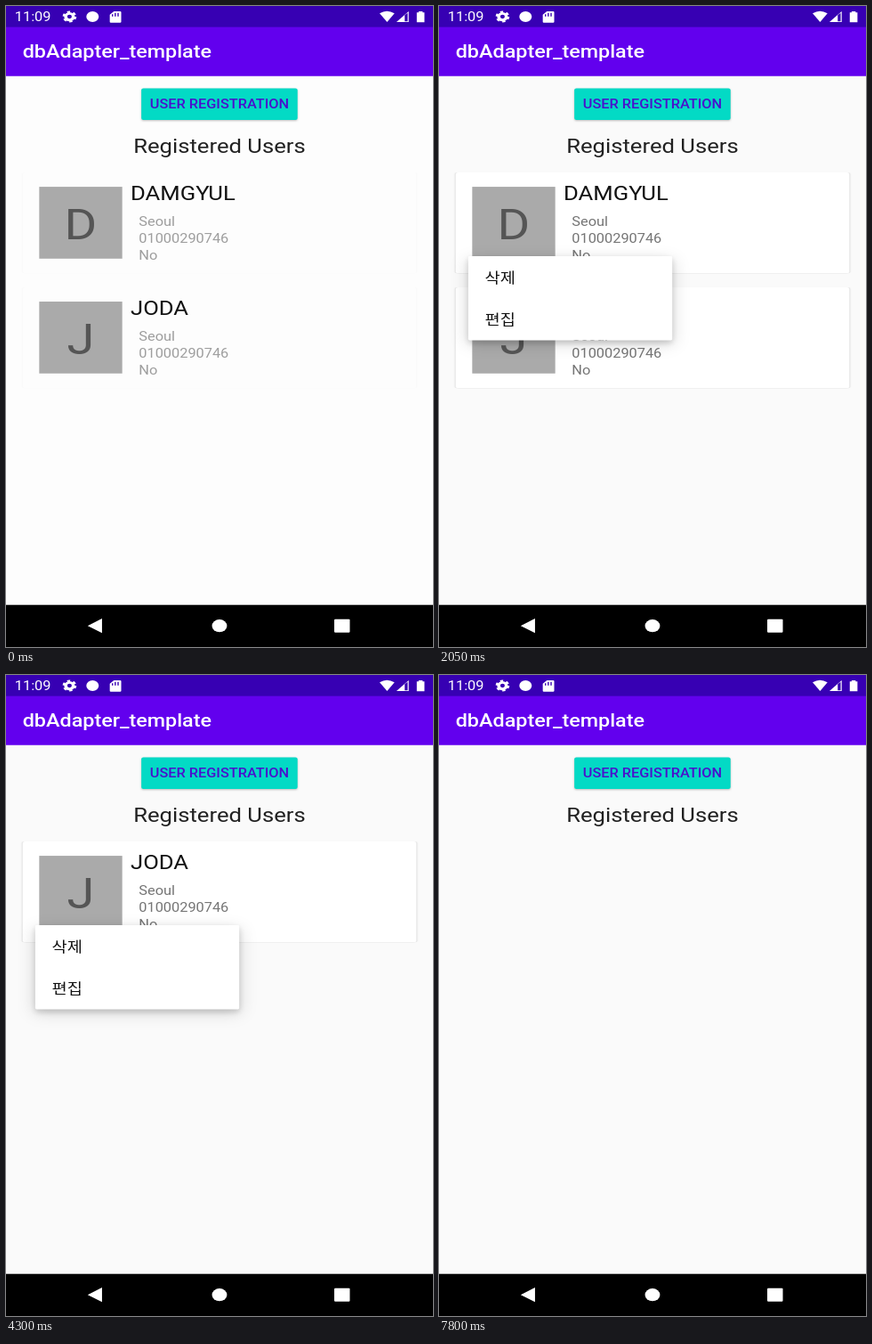
An HTML page for the animation above (7880 ms loop, 480 by 720 pixels).

```html
<!DOCTYPE html>
<html lang="en">
<head>
<meta charset="utf-8">
<title>Registered users</title>
<style>
  html, body { margin: 0; width: 100%; height: 100%; overflow: hidden; background: #fafafa; }
  svg { display: block; width: 480px; height: 720px; font-family: Roboto, sans-serif; }
  .paper { fill: #fff; filter: drop-shadow(0 .8px .8px rgba(0, 0, 0, .24)); }
  .name { font-size: 22px; fill: #111; }
  .info { font-size: 14px; fill: #757575; }
  .letter { font-size: 48px; fill: #555; text-anchor: middle; }
  .mid { text-anchor: middle; }
  .sheet { fill: #fff; filter: drop-shadow(0 3px 3px rgba(0, 0, 0, .16)) drop-shadow(0 4px 8px rgba(0, 0, 0, .16)); }
  .item { font: 16px "Noto Sans CJK KR", "Noto Sans CJK JP", "Noto Sans CJK", sans-serif; fill: #111; }
</style>
</head>
<body>
<!-- Laid out in dp; the screen is squeezed to the stage as a whole. -->
<svg viewBox="0 0 411.43 731.43" preserveAspectRatio="none">
  <defs>
    <clipPath id="reveal"><rect id="window"/></clipPath>
    <clipPath id="row"><rect width="196.5" height="48"/></clipPath>
  </defs>
  <rect id="back" width="412" height="732"/>
  <rect width="412" height="80" fill="#6200ee"/>
  <rect width="412" height="24" fill="#3700b3"/>
  <rect y="683.4" width="412" height="49"/>
  <rect x="130.4" y="94" width="150.5" height="36" rx="2" fill="#03dac5"
        style="filter:drop-shadow(0 1px 1px rgba(0,0,0,.25))"/>

  <g id="content">
    <g fill="#fff">
      <text x="8.4" y="17.3" font-size="14">11:09</text>
      <circle cx="61.2" cy="12.2" r="3.7" fill="none" stroke="#fff" stroke-width="3"/>
      <circle cx="61.2" cy="12.2" r="5.6" fill="none" stroke="#fff" stroke-width="2.2" stroke-dasharray="2.9 2.964"/>
      <circle cx="83.4" cy="12.2" r="6"/>
      <path d="M104 6h6q1 0 1 1v11q0 1-1 1h-9q-1 0-1-1v-8z"/>
      <path d="M102.6 9.5v2.4M105.3 8v3.9M108 8v3.9" stroke="#3700b3" stroke-width="1.2"/>
      <path d="M360 8.5q7-5.5 14.3 0L367.2 18.2z"/>
      <path d="M388 6v12.2h-11.8z"/>
      <path d="M384.2 10.5v7h2.8v-9.5z" fill="#3700b3"/>
      <path d="M397.6 6h3.8v1.3h1.8v11.2h-7.4V7.3h1.8z"/>
      <text x="16" y="59" font-size="20" font-weight="500">dbAdapter_template</text>
      <path d="M78.7 707.2l13.8-8.2v16.4z"/>
      <circle cx="205.7" cy="707.2" r="7.2"/>
      <rect x="316.3" y="699.8" width="15" height="15" rx="1"/>
    </g>
    <text class="mid" x="205.7" y="117.2" font-size="14" font-weight="500" fill="#4a0fcc">USER REGISTRATION</text>
    <text class="mid" x="205.7" y="167.7" font-size="22" fill="#212121">Registered Users</text>
    <g id="list"></g>
  </g>

  <g id="menu">
    <g clip-path="url(#reveal)">
      <rect class="sheet" width="196.5" height="96" rx="1.5"/>
      <g clip-path="url(#row)"><circle id="ripple" cx="98.2" cy="24"/></g>
      <text class="item" x="16" y="30">삭제</text>
      <text class="item" x="16" y="78">편집</text>
    </g>
  </g>
</svg>
<script>
const LOOP = 7880, TOP = 190, PITCH = 131;
const el = id => document.getElementById(id);
const set = (node, attrs) => { for (const k in attrs) node.setAttribute(k, attrs[k]); };
const ramp = (t, start, length) => Math.min(1, Math.max(0, (t - start) / length));
const smooth = u => (1 - Math.cos(Math.PI * u)) / 2;

// When each user's menu opens and when its delete row is tapped
const users = [
  { name: "DAMGYUL", open: 1840, tap: 3021 },
  { name: "JODA", open: 4090, tap: 6110 }
];

el("list").innerHTML = users.map(u => `<g class="card">
  <rect class="paper" x="16" width="379.5" height="115" rx="2"/>
  <rect x="32" y="16.3" width="80" height="82" fill="#aaa"/>
  <text class="letter" x="72" y="76.3">${u.name[0]}</text>
  <text class="name" x="120" y="31.5">${u.name}</text>
  <g class="info">${["Seoul", "01000290746", "No"].map((s, i) =>
    `<text x="128" y="${61 + i * 19.4}">${s}</text>`).join("")}</g></g>`).join("");
const cards = [...document.querySelectorAll(".card")];
const papers = [...document.querySelectorAll(".paper")];
const infos = [...document.querySelectorAll(".info")];

function drawMenu(t) {
  const user = users.find(u => t >= u.open && t < u.tap + 175);
  el("menu").style.display = user ? "" : "none";
  if (!user) return;
  const u = ramp(t, user.open, 290), away = (1 - u) ** 1.5;
  const since = t - user.tap;
  set(el("menu"), {
    transform: `translate(${15.7 + 88 * away} ${304 - 130 * away})`,
    opacity: ramp(u, 0, .35) * (1 - ramp(since, 55, 120))
  });
  const k = ramp(u, 0, .7), w = 260 * k, h = 160 * k;
  set(el("window"), { x: 98.2 - w / 2, y: 48 - h / 2, width: w, height: h });
  set(el("ripple"), {
    r: Math.max(0, 50 + .35 * since),
    opacity: since < 0 ? 0 : .22 * ramp(since, 0, 60)
  });
}

function draw(t) {
  // The picture starts soft and pale, then sharpens
  const soft = t < 280 ? 1 - t / 560 : 0;
  el("content").style.filter = soft ? `blur(${.65 * soft}px)` : "none";
  set(el("back"), { fill: soft ? "#fdfdfd" : "#fafafa" });
  cards.forEach((card, i) => {
    const shift = i ? PITCH * (1 - smooth(ramp(t, users[0].tap + 170, 250))) : 0;
    set(card, {
      transform: `translate(0 ${TOP + shift})`,
      opacity: 1 - ramp(t, users[i].tap + 50, 120)
    });
    set(papers[i], { opacity: 1 - .85 * soft });
    set(infos[i], { opacity: 1 - .3 * soft });
  });
  drawMenu(t);
}

const begin = performance.now();
function tick() {
  draw((performance.now() - begin) % LOOP);
  requestAnimationFrame(tick);
}
tick();
</script>
</body>
</html>
```
